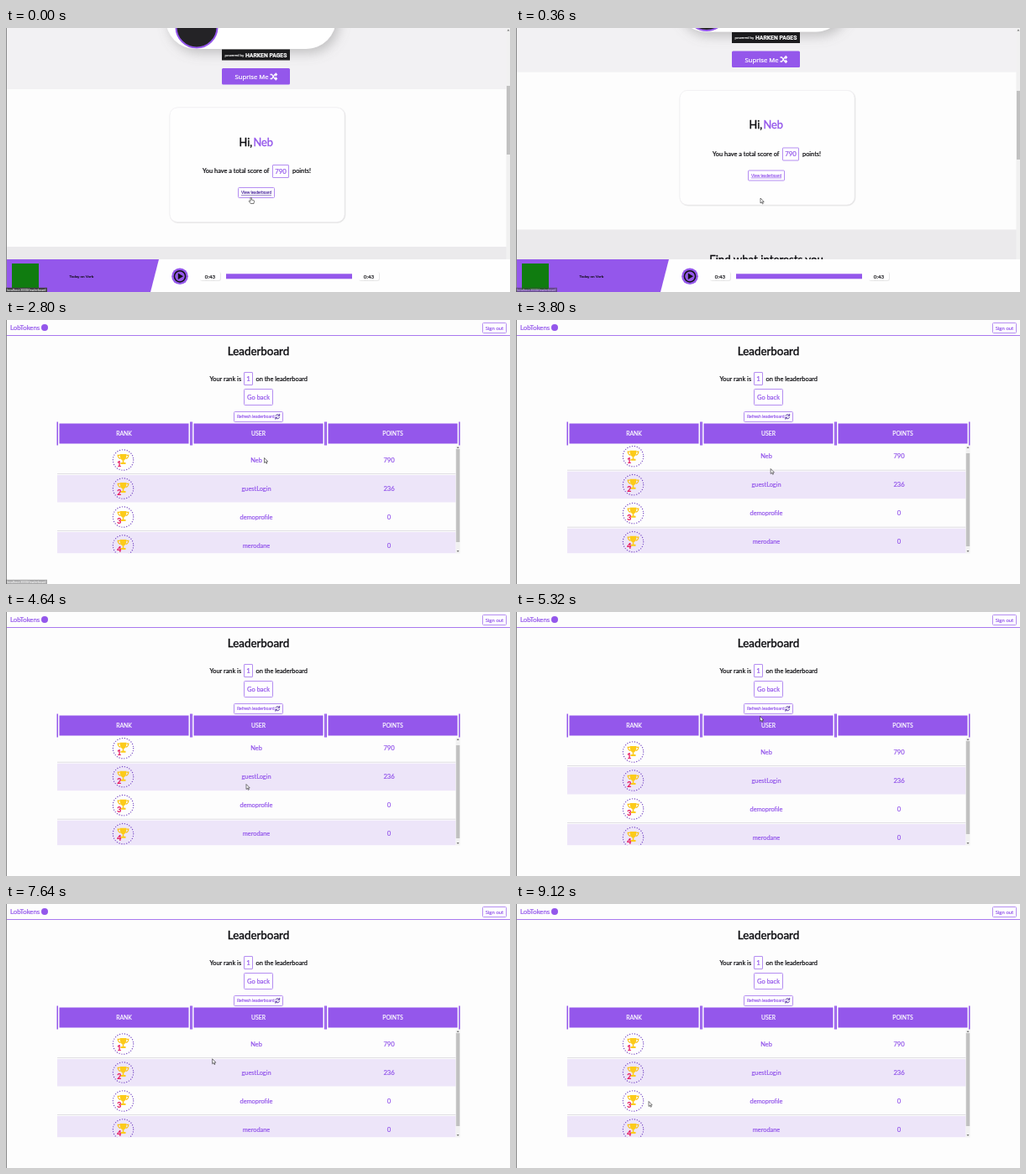
An HTML page for the animation above (9.24 s loop, 600x315 px).

```html
<!DOCTYPE html>
<html lang="en">
<head>
<meta charset="utf-8">
<title>Podcast leaderboard</title>
<style>
  html, body { margin: 0; width: 100%; height: 100%; overflow: hidden; background: #fdfdfd; }
  svg { display: block; width: 600px; height: 315px; font-family: Lato, "Open Sans", sans-serif; }
</style>
</head>
<body>
<svg id="stage" viewBox="0 0 600 315" xmlns="http://www.w3.org/2000/svg"></svg>
<script>
const LOOP = 9240, STEP = 40, PAGE_SWITCH = 2080;
const PURPLE = '#9457eb', LILAC = '#b48df1', INK = '#0b0b0f', HOVER = '#4d2a9e';
const stage = document.getElementById('stage');

// A hairline stroke gives the text a medium weight.
const text = (x, y, str, size, fill = INK, extra = '') =>
  `<text x="${x}" y="${y}" font-size="${size}" fill="${fill}" stroke="${fill}" stroke-width="${size * .028}" ${extra}>${str}</text>`;
const centered = (x, y, str, size, fill, extra = '') =>
  text(x, y, str, size, fill, `text-anchor="middle" ${extra}`);
const rect = (x, y, w, h, fill, extra = '') =>
  `<rect x="${x}" y="${y}" width="${w}" height="${h}" fill="${fill}" ${extra}/>`;
const outline = (x, y, w, h, r = 1) =>
  rect(x, y, w, h, '#fff', `rx="${r}" stroke="${LILAC}" stroke-width="1"`);
const path = (d, fill, extra = '') => `<path d="${d}" fill="${fill}" ${extra}/>`;

const shuffleIcon = path(
  'M314.5 55.5H316.5L320 60.5H322M314.5 60.5H316.5L320 55.5H322M320.7 53.8L322.4 55.5L320.7 57.2M320.7 58.8L322.4 60.5L320.7 62.2',
  'none', 'stroke="#fff" stroke-width="1.3"');

const refreshIcon = path(
  'M320.9 114.6A2.5 2.5 0 0 1 325.4 113.9M325.7 111.9V114.3H323.4M325.6 115.8A2.5 2.5 0 0 1 321.1 116.6M320.8 118.6V116.2H323.1',
  'none', `stroke="${HOVER}" stroke-width=".9"`);

const hero = `
  ${rect(0, -40, 596, 113, '#f2f1f3')}
  ${rect(190, -70, 203, 95, '#fff', 'rx="36" filter="url(#soft)"')}
  <circle cx="227" cy="-1" r="24.5" fill="#242326" stroke="${PURPLE}" stroke-width="2"/>
  ${rect(257, 25.5, 81, 13, '#1b1b1d')}
  ${text(260.5, 33.6, 'powered by', 4.4, '#fff')}
  ${text(285, 34.6, 'HARKEN PAGES', 6.8, '#fff', 'font-family="Roboto, sans-serif" font-weight="700"')}
  ${rect(257, 48, 81, 19.5, PURPLE, 'rx="1.5"')}
  ${text(272.5, 61, 'Suprise Me', 7.7, '#fff', 'font-family="Noto Sans, sans-serif"')}
  ${shuffleIcon}`;

const card = `
  ${rect(0, 73, 596, 188, '#fdfdfd')}
  ${rect(195, 95, 208, 136.5, '#fefefe', 'rx="9" stroke="#f1f0f3" stroke-width=".7" filter="url(#edge)"')}
  ${text(277.5, 140.5, 'Hi,', 12.8)}
  ${text(294.5, 140.5, 'Neb', 12.8, PURPLE)}
  ${text(234, 173.3, 'You have a total score of', 7.4)}
  ${outline(317.5, 163.5, 19, 15, .5)}
  ${centered(327, 173.6, '790', 7.8, PURPLE)}
  ${text(341, 173.3, 'points!', 7.4)}
  ${outline(276.5, 190.5, 43, 12)}
  ${centered(298, 198.2, 'View leaderboard', 4.7, PURPLE, 'id="link" text-decoration="underline"')}`;

const timeBox = x => rect(x - 12, 291, 24, 10, '#fff', 'rx="2" filter="url(#edge)"')
  + centered(x, 298.6, '0:43', 6.2);

const player = `
  ${rect(0, 276, 600, 39, '#fefefe', 'filter="url(#edge)"')}
  ${path('M0 276H182L172 315H0Z', PURPLE)}
  ${rect(7, 281, 32, 31, '#107c10')}
  ${text(75.5, 298, 'Today on Vorb', 4.6)}
  <circle cx="207" cy="296.3" r="9.8" fill="${PURPLE}"/>
  <circle cx="207" cy="296.3" r="6.6" fill="none" stroke="#111" stroke-width="1.5"/>
  ${path('M204.8 292.6L211 296.3L204.8 300Z', '#111')}
  ${timeBox(243)}
  ${rect(262, 293.3, 150, 6, PURPLE)}
  ${timeBox(432)}`;

const arrows = (x, top, bottom) => path(
  `M${x - 1.5} ${top + 1}h3l-1.5-2zM${x - 1.5} ${bottom - 1}h3l-1.5 2z`, '#777');

const homePage = `
  <g id="home">
    ${rect(0, 0, 600, 315, '#ebeaec')}
    <g id="scroller">${hero}${card}${centered(298, 301.8, 'Find what interests you', 13.25)}</g>
    ${rect(595.5, 0, 4.5, 315, '#f1f1f1')}
    ${arrows(598, 2.5, 312)}
    ${rect(596, 69, 4, 82, '#c1c1c1', 'id="thumb"')}
    ${player}
  </g>`;

const trophy = (y, rank) => `
  <g transform="translate(139.5 ${y})">
    <circle r="12.2" fill="none" stroke="#7546c4" stroke-width="1.4" stroke-linecap="round" stroke-dasharray="0 2.95"/>
    ${path('M-4-7H4C4-3 3 0 0 .8C-3 0-4-3-4-7ZM-.8 0H.8V3H3V5H-3V3H-.8Z', '#fccb1a')}
    ${path('M-4-5.6H-6.4C-6-3-4.6-1.6-3-1.6M4-5.6H6.4C6-3 4.6-1.6 3-1.6', 'none', 'stroke="#fac213" stroke-width="1.1"')}
    ${centered(-4.8, 8.2, rank, 8.6, '#e5175f', 'font-weight="700"')}
  </g>`;

const users = [['Neb', 790], ['guestLogin', 236], ['demoprofile', 0], ['merodane', 0]];
const rows = users.map(([name, points], i) => {
  const y = 167 + 34 * i;
  const back = i % 2
    ? rect(61, y - 16, 474.5, 32.5, '#ede5f9')
    : rect(61, y + 16, 474.5, 1, '#e0dee3');
  return back + trophy(y, i + 1)
    + centered(298, y + 2.6, name, 7.4, PURPLE)
    + centered(456, y + 2.6, points, 7.6, PURPLE);
}).join('');

const headings = [['RANK', 64], ['USER', 224], ['POINTS', 384]].map(([label, x]) =>
  rect(x - .5, 123.5, 154, 24, PURPLE)
  + rect(x - 3.5, 121.5, 1.5, 28, PURPLE)
  + rect(x + 155, 121.5, 1.5, 28, PURPLE)
  + centered(x + 76.5, 138, label, 6.8, '#fff')).join('');

const boardPage = `
  <g id="board">
    ${rect(0, 0, 600, 315, '#fdfdfd')}
    ${rect(0, 18, 600, 1, '#a878ef')}
    ${text(5, 12.3, 'LobTokens', 7.8, PURPLE)}
    <circle cx="46" cy="9" r="4" fill="${PURPLE}"/>
    ${outline(567.5, 3.5, 28, 12)}
    ${centered(581.5, 11.6, 'Sign out', 6, PURPLE)}
    ${centered(300.5, 42, 'Leaderboard', 13.4)}
    ${text(242.5, 72.6, 'Your rank is', 7.4)}
    ${outline(283.5, 62.5, 10, 15, .5)}
    ${centered(288.5, 72.8, '1', 7.8, PURPLE)}
    ${text(297.5, 72.6, 'on the leaderboard', 7.4)}
    ${outline(283.5, 82.5, 34, 19)}
    ${centered(300.5, 95, 'Go back', 7.5, PURPLE, 'id="back"')}
    ${outline(271.5, 109.5, 58, 12)}
    ${text(275, 117, 'Refresh leaderboard', 5.05, PURPLE)}
    ${refreshIcon}
    ${headings}
    <g clip-path="url(#tableClip)"><g id="rows">${rows}</g></g>
    ${rect(535.5, 150, 5, 128.5, '#f1f1f1')}
    ${arrows(538, 152, 276)}
    ${rect(535.8, 154, 4.4, 111, '#c1c1c1', 'id="tableThumb"')}
  </g>`;

const cursors = `
  <g id="cursor" stroke="#222" stroke-width=".6" stroke-linejoin="round">
    ${path('M0 0V6L1.4 4.7L2.4 6.8L3.3 6.4L2.4 4.4H4.2Z', '#fff', 'id="arrow"')}
    ${path('M0 .5Q.7-.3 1.3.5V3L4 3.6Q4.6 3.8 4.5 4.6L4 7.5H.3L-1.8 4.6Q-1.6 3.8-.8 4.1L0 4.8Z', '#fff', 'id="hand"')}
  </g>`;

stage.innerHTML = `
  <defs>
    <filter id="soft" x="-30%" y="-30%" width="160%" height="180%">
      <feDropShadow dx="4" dy="5" stdDeviation="7" flood-color="#777" flood-opacity=".4"/>
    </filter>
    <filter id="edge" x="-10%" y="-20%" width="120%" height="140%">
      <feDropShadow dx=".5" dy=".5" stdDeviation=".6" flood-color="#888" flood-opacity=".4"/>
    </filter>
    <clipPath id="tableClip"><rect x="60" y="150" width="476" height="128.3"/></clipPath>
  </defs>
  ${homePage}${boardPage}
  ${rect(0, 0, 1, 315, '#8a8a8a')}
  <g id="status">
    ${rect(0, 309.8, 49, 5.2, '#414144', 'id="statusBox"')}
    ${text(1.2, 314, '', 3.8, '#e4e4e4', 'id="address"')}
  </g>
  ${cursors}`;

const el = Object.fromEntries([...stage.querySelectorAll('[id]')].map(n => [n.id, n]));
const show = (node, on) => node.setAttribute('display', on ? 'inline' : 'none');
const shift = (node, x, y) => node.setAttribute('transform', `translate(${x} ${y})`);
const tint = (node, color) => {
  node.setAttribute('fill', color);
  node.setAttribute('stroke', color);
};

// Linear interpolation through [time, value] keys.
function track(keys, t) {
  const next = keys.findIndex(k => k[0] > t);
  if (next < 0) return keys[keys.length - 1][1];
  if (next === 0) return keys[0][1];
  const [t0, a] = keys[next - 1], [t1, b] = keys[next];
  return a + (b - a) * (t - t0) / (t1 - t0);
}

const pageScroll = [[0, 0], [360, 20.5], [640, 33]];
const tableScroll = [[3300, 0], [3460, 4.3], [4660, 4.3], [4800, 0]];
const statusFade = [[0, 1], [280, 1], [460, 0], [1280, 0], [1360, 1], [2700, 1], [2880, 0],
  [5440, 0], [5520, 1], [6480, 1], [6680, 0]];
const cursorPath = [[0, 291, 202], [360, 291, 203], [900, 291, 203], [1400, 301, 164],
  [2300, 301, 164], [2800, 307.5, 164.5], [3840, 303, 178], [4640, 286, 205.5],
  [4840, 287, 195], [5500, 292, 98], [6240, 292, 98], [6440, 291.5, 105.5],
  [7200, 280, 160], [8160, 205, 214], [8800, 158, 235.5]];
const cursorX = cursorPath.map(([t, x]) => [t, x]);
const cursorY = cursorPath.map(([t, , y]) => [t, y]);

function render(t) {
  const onHome = t < PAGE_SWITCH;
  show(el.home, onHome);
  show(el.board, !onHome);

  const scroll = track(pageScroll, t);
  shift(el.scroller, 0, -scroll);
  shift(el.thumb, 0, scroll * .29);

  const tableOffset = track(tableScroll, t);
  shift(el.rows, 0, -tableOffset);
  shift(el.tableThumb, 0, tableOffset * 1.16);

  const overLink = t < 160 || (t >= 1300 && onHome);
  const overBack = t >= 5460 && t < 6480;
  tint(el.link, overLink ? HOVER : PURPLE);
  tint(el.back, overBack ? '#7138cf' : PURPLE);

  const leaving = t < 4000;
  el.address.textContent = leaving ? 'localhost:3000/leaderboard' : 'localhost:3000/home';
  el.statusBox.setAttribute('width', leaving ? 49 : 39);
  el.status.setAttribute('opacity', track(statusFade, t));

  shift(el.cursor, track(cursorX, t), track(cursorY, t));
  show(el.hand, overLink || overBack);
  show(el.arrow, !overLink && !overBack);
}

const start = performance.now();
function tick() {
  const t = (performance.now() - start) % LOOP;
  render(Math.floor(t / STEP) * STEP);
  requestAnimationFrame(tick);
}
render(0);
requestAnimationFrame(tick);
</script>
</body>
</html>
```
